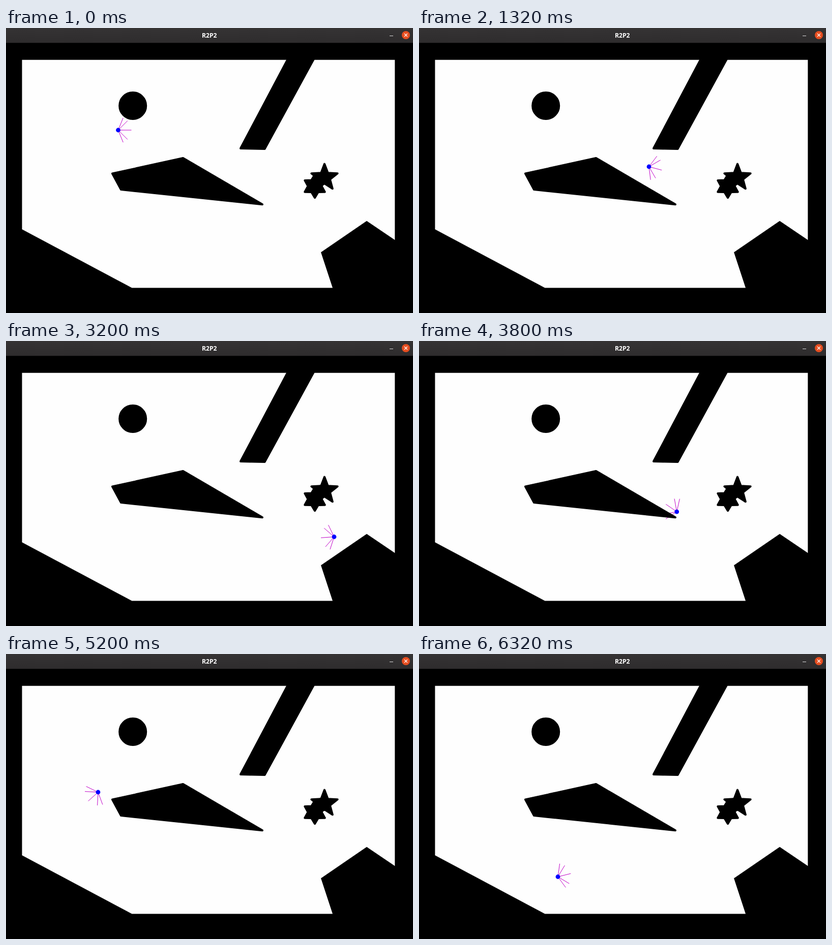
An HTML page that plays this animation: 800x561 px, repeating every 6400 ms.

```html
<!DOCTYPE html>
<html lang="en">
<head>
<meta charset="utf-8">
<title>R2P2</title>
<style>
  html, body { margin: 0; width: 100%; height: 100%; overflow: hidden; background: #000; }
  svg { display: block; width: 100vw; height: 100vh; }
  text { font: bold 12.2px "Open Sans", "Noto Sans", sans-serif; fill: #fff; text-anchor: middle; }
  .solid { stroke: #000; stroke-width: 4; stroke-linejoin: round; }
  #rays { stroke: #c000c8; fill: none; }
</style>
</head>
<body>
<svg viewBox="0 0 800 561" xmlns="http://www.w3.org/2000/svg">
  <rect width="800" height="561"/>
  <defs>
    <linearGradient id="bar" x2="0" y2="1">
      <stop stop-color="#353334"/>
      <stop offset="1" stop-color="#2e2c2d"/>
    </linearGradient>
  </defs>
  <rect width="800" height="29.5" fill="url(#bar)"/>
  <text x="399.7" y="18.6">R2P2</text>
  <path d="M754 15.5h7" stroke="#ddd"/>
  <circle cx="786" cy="14" r="8" fill="#e64e20"/>
  <path d="M783 11l6 6m0-6l-6 6" stroke="#fff" stroke-width="1.2"/>

  <path fill="#fefefe"
        d="M31.500 62.400H764.300V417.300L709 379.700 619 441.500 642 511.500H247.500L31.500 396.300Z"/>
  <path id="rays"/>
  <g class="solid">
    <circle cx="249.200" cy="153" r="26"/>
    <path d="M553.500 62H604.500L508.500 238 461 237Z"/>
    <path d="M348 256L209 286.500 226 318 504 347.300Z"/>
    <path id="star5"/>
    <path id="star6"/>
  </g>
  <rect y="29.500" width="800" height="32.900"/>
  <circle id="robot" r="4.400" fill="#00f"/>
</svg>
<script>
const LOOP = 6400, STEP = 40, LAST = 6320;
const CRUISE = 0.25, CRAWL = 0.03; // px per ms
const RAY = 26, RAD = Math.PI / 180;
const SENSORS = [-68, -45, 0, 45, 68];

// Key poses: time, x, y, heading in degrees
const poses = [
  [0, 220.5, 201, 0],
  [680, 296, 204, 12],
  [1320, 452, 273, 15],
  [1800, 569, 257, -22],
  [2280, 682, 256, 35],
  [2720, 731, 341, 132],
  [3200, 645, 385.5, 176],
  [4440, 368, 240, 207],
  [5200, 181, 272, 138],
  [5760, 166, 398, 58],
  [LAST, 273, 438.5, -14]
].map(([t, x, y, deg]) => {
  const speed = t === 0 || t === LAST ? CRAWL : CRUISE;
  return { t, x, y, vx: speed * Math.cos(deg * RAD), vy: speed * Math.sin(deg * RAD) };
});

const byId = id => document.getElementById(id);

function star(cx, cy, points, outer, inner) {
  const corners = Array.from({ length: points * 2 }, (_, i) => {
    const r = i % 2 ? inner : outer, a = (i / points - 0.5) * Math.PI;
    return `${cx + r * Math.cos(a)} ${cy + r * Math.sin(a)}`;
  });
  return `M${corners.join("L")}Z`;
}

// Cubic Hermite value and slope along one axis
function hermite(a, b, axis, t) {
  const span = b.t - a.t, u = (t - a.t) / span;
  const d = b[axis] - a[axis];
  const m = a["v" + axis] * span, n = b["v" + axis] * span;
  const c2 = 3 * d - 2 * m - n, c3 = m + n - 2 * d;
  return {
    pos: a[axis] + u * (m + u * (c2 + u * c3)),
    slope: m + u * (2 * c2 + 3 * u * c3)
  };
}

function render(time) {
  const t = Math.min(Math.floor((time % LOOP) / STEP) * STEP, LAST);
  const next = Math.max(1, poses.findIndex(p => p.t >= t));
  const [x, y] = ["x", "y"].map(axis => hermite(poses[next - 1], poses[next], axis, t));
  const heading = Math.atan2(y.slope, x.slope);
  byId("robot").setAttribute("cx", x.pos);
  byId("robot").setAttribute("cy", y.pos);
  byId("rays").setAttribute("d", SENSORS.map(deg => {
    const a = heading + deg * RAD;
    return `M${x.pos} ${y.pos}l${RAY * Math.cos(a)} ${RAY * Math.sin(a)}`;
  }).join(""));
}

byId("star5").setAttribute("d", star(626, 294.5, 5, 27, 11.5));
byId("star6").setAttribute("d", star(607, 311.3, 6, 22.8, 13.5));

const start = performance.now();
function tick() {
  render(performance.now() - start);
  requestAnimationFrame(tick);
}
tick();
</script>
</body>
</html>
```
